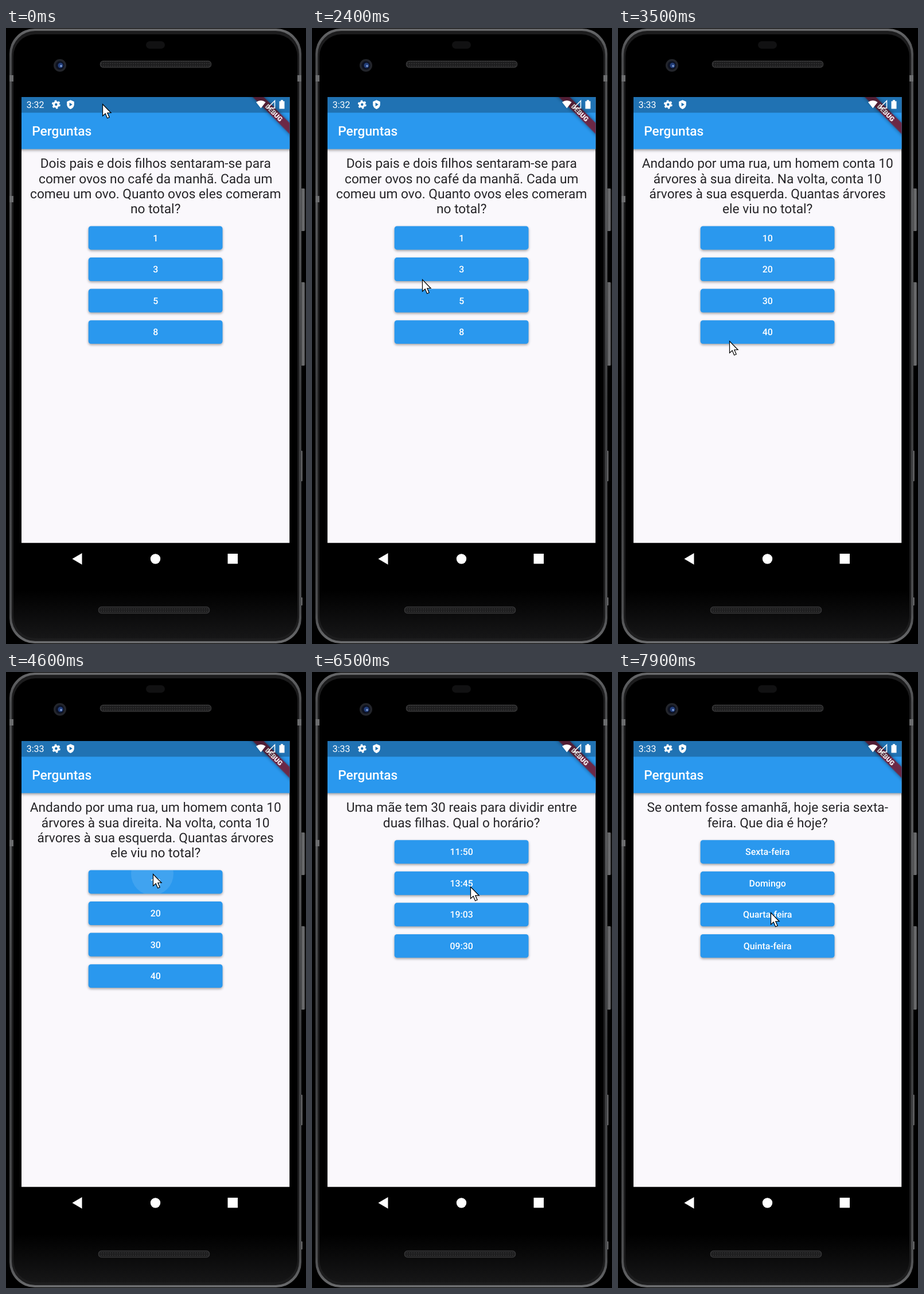
Animation of 523x1071 px, one loop 8000 ms. Source, as an HTML page:

```html
<!DOCTYPE html>
<html lang="pt">
<head>
<meta charset="utf-8">
<title>Perguntas</title>
<style>
html, body { margin: 0; width: 100%; height: 100%; overflow: hidden; background: #000; }
svg { display: block; width: 100vw; height: 100vh; }
text { font-family: Roboto, "Liberation Sans", sans-serif; text-rendering: geometricPrecision; fill: #fff; }
.ask { font-size: 22.73px; text-anchor: middle; fill: #262528; }
.label { font-size: 15.9px; font-weight: 500; text-anchor: middle; }
.button { fill: #2a98ee; filter: drop-shadow(0 2px 2px rgba(0, 0, 0, .36)); }
</style>
</head>
<body>
<svg viewBox="0 0 523 1071" preserveAspectRatio="none">
  <defs>
    <linearGradient id="rim" x2="0" y2="1">
      <stop offset="0" stop-color="#666769"/><stop offset=".05" stop-color="#4a4b4d"/>
      <stop offset=".27" stop-color="#58595b"/><stop offset=".6" stop-color="#3c3d3f"/>
      <stop offset=".95" stop-color="#4c4d4f"/><stop offset="1" stop-color="#6a6b6d"/>
    </linearGradient>
    <linearGradient id="glass" x2="0" y2="1">
      <stop offset=".92" stop-color="#000"/><stop offset="1" stop-color="#161617"/>
    </linearGradient>
    <linearGradient id="key">
      <stop offset="0" stop-color="#2a2a2b"/><stop offset=".6" stop-color="#77787a"/><stop offset="1" stop-color="#3a3a3b"/>
    </linearGradient>
    <pattern id="mesh" width="4" height="4" patternUnits="userSpaceOnUse">
      <rect width="4" height="4" fill="#1d1d1e"/><circle cx="2" cy="2" r="1.1" fill="#333334"/>
    </pattern>
    <clipPath id="screen"><rect x="27" y="120" width="467.5" height="775.5"/></clipPath>
    <clipPath id="hit"><rect id="hitBox" x="143.7" width="233.8" height="40.9" rx="4.5"/></clipPath>
  </defs>

  <!-- phone -->
  <g fill="url(#key)">
    <rect x="513" y="279" width="8.5" height="74" rx="2"/>
    <rect x="513" y="442" width="8.5" height="145" rx="2"/>
    <rect x="513" y="735" width="4" height="53" rx="1"/>
    <rect x="513" y="990" width="4" height="14" rx="1"/>
  </g>
  <rect x="6" y="1" width="509" height="1069" rx="44" fill="url(#rim)"/>
  <rect x="10" y="5" width="501" height="1061" rx="41" fill="#1c1c1d"/>
  <rect x="13" y="11" width="495" height="1050" rx="38" fill="url(#glass)"/>
  <path d="M6 82h7v11H6zM6 292h7v11H6zM508 82h7v11h-7z" fill="#6b6c6e"/>
  <rect x="244" y="23" width="33" height="13" rx="6.5" fill="#111112"/>
  <circle cx="94" cy="65" r="11" fill="#23252b"/>
  <circle cx="94" cy="65" r="7.5" fill="#0d1222"/>
  <circle cx="95" cy="65" r="4.5" fill="#233f7c"/>
  <circle cx="96" cy="66" r="1.7" fill="#8ea7d8"/>
  <g fill="url(#mesh)" stroke="#353536" stroke-width="1.5">
    <rect x="164.5" y="57.5" width="193" height="11" rx="5"/>
    <rect x="161.5" y="1006.5" width="193" height="11" rx="5"/>
  </g>

  <!-- app -->
  <g clip-path="url(#screen)">
    <rect x="27" y="120" width="467.5" height="775.5" fill="#faf8fc"/>
    <g id="quiz"></g>
    <rect x="20" y="100" width="482" height="110.5" fill="#2a98ee" style="filter:drop-shadow(0 2px 2.5px rgba(0,0,0,.4))"/>
    <text x="45.2" y="187" font-size="22.73" font-weight="500">Perguntas</text>
    <g transform="translate(494.5 120) scale(1.1363) rotate(45)">
      <rect x="-60" y="28" width="120" height="12" fill="#732440" fill-opacity=".92" style="filter:drop-shadow(0 0 3px rgba(0,0,0,.5))"/>
      <text y="37.7" font-size="10.2" font-weight="900" text-anchor="middle">DEBUG</text>
    </g>
    <rect x="27" y="120" width="467.5" height="27.3" fill-opacity=".25"/>
    <text id="clock" x="35.7" y="139.3" font-size="16"></text>
    <g fill="#fff">
      <circle cx="87.3" cy="133" r="4" fill="none" stroke="#fff" stroke-width="3.6"/>
      <circle cx="87.3" cy="133" r="6.3" fill="none" stroke="#fff" stroke-width="2.4" stroke-dasharray="3.3 3.3"/>
      <path d="M112.5 125.3l6.3 2.8v4.6c0 4-2.7 7-6.3 8.2-3.6-1.2-6.3-4.2-6.3-8.2v-4.6z"/>
      <path d="M110.6 129.8v6.4l5.2-3.2z" fill="#2073b3"/>
      <path d="M444.3 139.5l-8.3-10.4q8.3-6.3 16.6 0z"/>
      <path d="M468.5 126.5v12.7h-12.7z" fill="none" stroke="#fff" stroke-width="1.5"/>
      <path d="M476.5 127.2h2.5v-1.9h4v1.9h2.5v13.2h-9z"/>
    </g>
  </g>
  <g fill="#fff">
    <path d="M115.5 923l17-10v20z"/>
    <circle cx="260.5" cy="923" r="8.7"/>
    <rect x="386.5" y="914" width="17.5" height="17.5"/>
  </g>
  <path id="cursor" d="M.5.5v20.5l4.7-4.2 3.4 8 3.6-1.5-3.4-7.8h6.3z" fill="#fff" stroke="#000" stroke-width="1.2"/>
</svg>
<script>
const LOOP = 8000, STEP = 100, MID = 260.7;
const $ = id => document.getElementById(id);

const questions = [
  { from: 0,
    ask: ['Dois pais e dois filhos sentaram-se para', 'comer ovos no café da manhã. Cada um',
      'comeu um ovo. Quanto ovos eles comeram', 'no total?'],
    answers: ['1', '3', '5', '8'] },
  { from: 3100,
    ask: ['Andando por uma rua, um homem conta 10', 'árvores à sua direita. Na volta, conta 10',
      'árvores à sua esquerda. Quantas árvores', 'ele viu no total?'],
    answers: ['10', '20', '30', '40'] },
  { from: 4800,
    ask: ['Uma mãe tem 30 reais para dividir entre', 'duas filhas. Qual o horário?'],
    answers: ['11:50', '13:45', '19:03', '09:30'] },
  { from: 6800,
    ask: ['Se ontem fosse amanhã, hoje seria sexta-', 'feira. Que dia é hoje?'],
    answers: ['Sexta-feira', 'Domingo', 'Quarta-feira', 'Quinta-feira'] }
];

// time, x, y of the pointer tip
const track = [
  [0, 168, 132], [300, 158, 12], [500, 140, 90], [900, 108, 287],
  [1700, 108, 287], [2100, 186, 446], [2300, 186, 446], [2400, 192, 437], [2600, 200, 428],
  [3100, 200, 428], [3500, 194, 544], [3600, 198, 531], [3800, 210, 512],
  [4100, 210, 512], [4500, 256, 351], [4700, 256, 351], [5000, 298, 605],
  [5200, 298, 605], [5900, 290, 400], [6500, 276, 373], [6900, 276, 373],
  [7700, 285, 415], [7900, 266, 418], [8000, 266, 418]
];

// button row and press point, dy measured from the button's top
const taps = [
  { at: 2750, row: 1, x: 200, dy: 29 },
  { at: 4500, row: 0, x: 255, dy: 6.5 },
  { at: 6550, row: 1, x: 276, dy: 26 }
];

const rowTop = (q, row) => 240 + 26.13 * q.ask.length + 54.55 * row;

function draw(q) {
  const lines = q.ask.map((s, i) => `<text class="ask" x="${MID}" y="${243.4 + 26.13 * i}">${s}</text>`);
  const plates = q.answers.map((s, i) =>
    `<rect class="button" x="143.7" y="${rowTop(q, i)}" width="233.8" height="40.9" rx="4.5"/>`);
  const labels = q.answers.map((s, i) => `<text class="label" x="${MID}" y="${rowTop(q, i) + 26.1}">${s}</text>`);
  $('quiz').innerHTML = lines.join('') + plates.join('') +
    '<g clip-path="url(#hit)"><circle id="ripple" fill="#fff"/></g>' + labels.join('');
}

function pointer(t) {
  const i = track.findIndex(p => p[0] > t);
  const [a, b] = [track[i - 1], track[i]];
  const k = (t - a[0]) / (b[0] - a[0]);
  return [1, 2].map(n => a[n] + (b[n] - a[n]) * k);
}

function ripple(t, q) {
  const tap = taps.find(p => t >= p.at && t < p.at + 800);
  const node = $('ripple');
  node.setAttribute('opacity', 0);
  if (!tap) return;
  const age = (t - tap.at) / 1000, y = rowTop(q, tap.row);
  $('hitBox').setAttribute('y', y);
  node.setAttribute('cx', tap.x);
  node.setAttribute('cy', y + tap.dy);
  node.setAttribute('r', 20 + 80 * age + 900 * age * age);
  node.setAttribute('opacity', 0.1 * Math.min(1, (0.8 - age) / 0.4));
}

let shown;
function frame(now) {
  const t = Math.floor(now % LOOP / STEP) * STEP;
  const q = questions.filter(p => p.from <= t).pop();
  if (q !== shown) draw(shown = q);
  $('clock').textContent = t < 3100 ? '3:32' : '3:33';
  $('cursor').setAttribute('transform', `translate(${pointer(t)})`);
  ripple(t, q);
}

let start;
function tick(now) {
  start ??= now;
  frame(now - start);
  requestAnimationFrame(tick);
}
frame(0);
requestAnimationFrame(tick);
</script>
</body>
</html>
```
